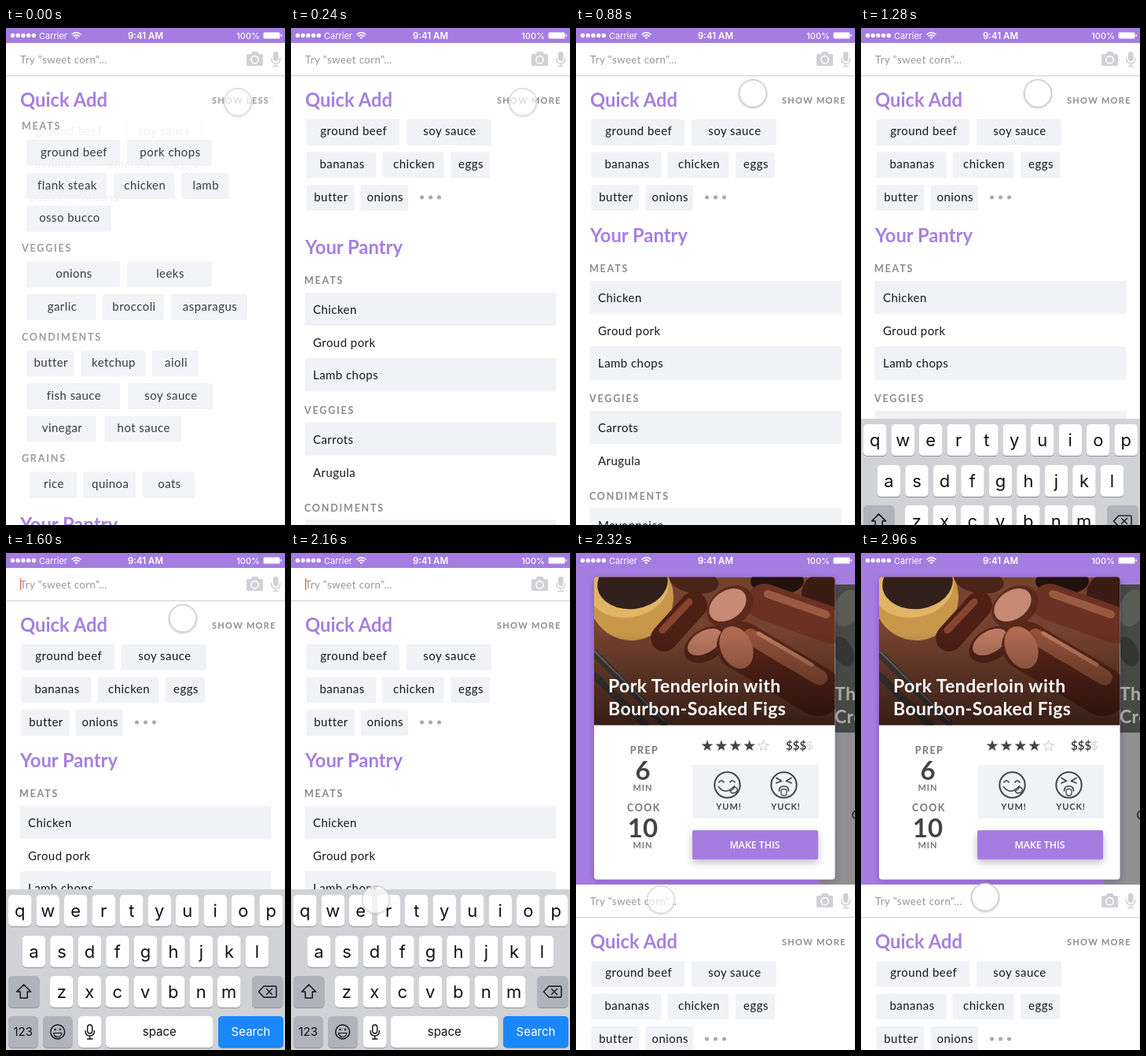
Recreate the animation shown at these times as an HTML page. Size 355 px wide and 631 px high, loop 3760 ms.

```html
<!DOCTYPE html>
<html lang="en">
<head>
<meta charset="utf-8">
<title>Pantry search</title>
<style>
  html, body { margin: 0; width: 100%; height: 100%; overflow: hidden; background: #fff; }
  svg { display: block; width: 100%; height: 100%; }
  text { font: 15px Lato, sans-serif; letter-spacing: .45px; fill: #181818; white-space: pre; }
  .mid { text-anchor: middle; }
  .title { font-size: 23.8px; font-weight: 700; letter-spacing: 0; fill: #a67fe0; }
  .head { font-size: 12.5px; font-weight: 700; letter-spacing: 1.8px; fill: #8b8b8b; }
  .toggle { font-size: 11px; font-weight: 700; letter-spacing: 1.3px; fill: #8b8b8b; }
  .hint { font-size: 13.2px; letter-spacing: .45px; fill: #96969b; }
  .status { font: 11px Inter, sans-serif; letter-spacing: 0; fill: #fff; }
  .clock { font-size: 11.5px; font-weight: 600; }
  .charge { font-weight: 500; }
  .dish { font-size: 23px; font-weight: 700; letter-spacing: .4px; fill: #fff; }
  .label { font-size: 12.5px; font-weight: 700; letter-spacing: 1.5px; fill: #777; }
  .unit { font-size: 11px; font-weight: 700; letter-spacing: 1px; fill: #777; }
  .number { font-size: 33px; font-weight: 700; letter-spacing: 0; fill: #444; }
  .price { font-weight: 700; letter-spacing: 0; fill: #444; }
  .vote { font-size: 11px; font-weight: 700; letter-spacing: .9px; fill: #444; }
  .action { font: 600 12.3px "Open Sans", sans-serif; letter-spacing: 0; fill: #fff; }
  .key { font: 22px Inter, sans-serif; letter-spacing: 0; fill: #111; }
  .small { font-size: 15px; }
</style>
</head>
<body>
<svg id="stage" viewBox="0 0 355 631"></svg>
<script>
const LOOP = 3760, STEP = 80;
const PURPLE = '#a57de1', PALE = '#f0f2f5', INK = '#444';

const rect = (x, y, w, h, fill, r = 0, more = '') =>
  `<rect x="${x}" y="${y}" width="${w}" height="${h}" rx="${r}" fill="${fill}" ${more}/>`;
const circle = (x, y, r, fill, more = '') =>
  `<circle cx="${x}" cy="${y}" r="${r}" fill="${fill}" ${more}/>`;
const oval = (x, y, rx, ry, fill, turn = 0) =>
  `<ellipse rx="${rx}" ry="${ry}" fill="${fill}" transform="translate(${x} ${y}) rotate(${turn})"/>`;
const line = (d, color, width, fill = 'none') =>
  `<path d="${d}" fill="${fill}" stroke="${color}" stroke-width="${width}" stroke-linecap="round" stroke-linejoin="round"/>`;
const text = (x, y, label, cls = '', more = '') =>
  `<text x="${x}" y="${y}" class="${cls}" ${more}>${label}</text>`;
const group = (id, ...parts) => `<g id="${id}">${parts.join('')}</g>`;

// A row of chips: [left, right, label] each.
const chips = (y, ...items) => items.map(([left, right, label]) =>
  rect(left, y, right - left, 33, PALE, 2) +
  text((left + right) / 2 + 1, y + 20.5, label, 'mid')).join('');

function statusBar() {
  let out = rect(0, 0, 355, 18.5, PURPLE);
  for (let i = 0; i < 5; i++) out += circle(8.5 + i * 6.7, 9.5, 2.7, '#fff');
  out += text(42, 13.5, 'Carrier', 'status');
  out += line('M84 8Q89.500 3.500 95 8M86 10.300Q89.500 7.500 93 10.300', '#fff', 1.6) + circle(89.5, 12.4, 1.4, '#fff');
  out += text(177.5, 13.5, '9:41 AM', 'status clock mid') + text(293.3, 13.5, '100%', 'status charge');
  return out + rect(327.5, 5.5, 21, 8, '#fff', 1.5) + rect(349.5, 8, 1.5, 3, '#fff', .7);
}

function searchBar() {
  const gray = '#d0d0d5';
  return text(18, 44.5, 'Try "sweet corn"…', 'hint') +
    `<path d="M308 33h3.500l2-3h6.500l2 3h3.500q1.500 0 1.500 1.500v12q0 1.500-1.500 1.500h-17.500q-2 0-2-1.500v-12q0-1.500 2-1.500z" fill="${gray}"/>` +
    circle(316.5, 40.3, 4.7, gray, 'stroke="#fff" stroke-width="1.6"') +
    rect(340, 30, 6.5, 12, gray, 3.2) +
    line('M337.700 38.500q0 6.500 5.500 6.500t5.500-6.500M343.200 45v3.500M340 48.500h6.500', gray, 1.5) +
    rect(0, 60, 355, 1, '#d5d5da') + rect(0, 61, 355, 1, '#f2f2f4');
}

const collapsed = () =>
  text(262, 96, 'SHOW MORE', 'toggle') +
  chips(115.7, [19.5, 138, 'ground beef'], [147, 255, 'soy sauce']) +
  chips(157.5, [19.5, 108.5, 'bananas'], [116.5, 194.5, 'chicken'], [203, 253, 'eggs']) +
  chips(199, [19.5, 80.5, 'butter'], [88.5, 149, 'onions']) +
  [166.5, 177.5, 188.5].map(x => circle(x, 215, 2.5, '#a9a9a9')).join('');

const expanded = () =>
  text(262, 96, 'SHOW LESS', 'toggle') +
  text(20, 129, 'MEATS', 'head') +
  chips(142, [26, 145, 'ground beef'], [154, 262, 'pork chops']) +
  chips(184, [26, 128, 'flank steak'], [137, 214.5, 'chicken'], [223, 283.5, 'lamb']) +
  chips(225.5, [26, 134, 'osso bucco']) +
  text(20, 283.5, 'VEGGIES', 'head') +
  chips(296.5, [26, 145, 'onions'], [154, 262, 'leeks']) +
  chips(338, [26, 115, 'garlic'], [123, 201, 'broccoli'], [210, 307, 'asparagus']) +
  text(20, 396.5, 'CONDIMENTS', 'head') +
  chips(409.5, [26, 86.5, 'butter'], [95, 177, 'ketchup'], [185.5, 245.5, 'aioli']) +
  chips(451, [26, 145, 'fish sauce'], [155, 263, 'soy sauce']) +
  chips(492.5, [26, 115, 'vinegar'], [125.5, 223, 'hot sauce']) +
  text(20, 550.5, 'GRAINS', 'head') +
  chips(563.5, [30, 90, 'rice'], [98.5, 165, 'quinoa'], [174, 240, 'oats']);

function pantry() {
  const sections = { MEATS: ['Chicken', 'Groud pork', 'Lamb chops'], VEGGIES: ['Carrots', 'Arugula'], CONDIMENTS: ['Mayonnaise'] };
  let y = 321, out = text(18, 272, 'Your Pantry', 'title');
  for (const [name, foods] of Object.entries(sections)) {
    out += text(17, y - 10.8, name, 'head');
    foods.forEach((food, i) => {
      if (i % 2 == 0) out += rect(17.5, y, 320, 42.3, PALE);
      out += text(28, y + 27, food);
      y += 41.7;
    });
    y += 40;
  }
  return out;
}

function keyboard() {
  const key = (x, y, w, label = '', fill = '#fff', cls = 'key mid', ink = '#111') =>
    rect(x, y + 1, w, 40, '#929497', 5) + rect(x, y, w, 40, fill, 5) +
    text(x + w / 2, y + (cls.includes('small') ? 25 : 27.5), label, cls, `style="fill:${ink}"`);
  const row = (letters, x, y) => [...letters].map((c, i) => key(x + i * 35.5, y, 29.5, c)).join('');
  const dark = '#b0b4ba', small = 'key small mid';
  return rect(0, 427, 355, 206, '#d0d2d6') +
    row('qwertyuiop', 3, 434) + row('asdfghjkl', 20.7, 486) + row('zxcvbnm', 56, 537) +
    key(3, 537, 39.5, '', dark) + key(313, 537, 39.5, '', dark) +
    line('M22.700 548l9 9h-4.500v8h-9v-8h-4.500z', '#111', 1.5) +
    line('M328 550h14.500q1.500 0 1.500 1.500v11q0 1.500-1.500 1.500h-14.500l-6.500-7zM331.500 553.500l7 7M338.500 553.500l-7 7', '#111', 1.4) +
    key(3, 588, 37.5, '123', dark, small) + key(47, 588, 37.5, '', dark) + key(92, 588, 29.5) +
    key(127, 588, 136.5, 'space', '#fff', small) + key(270, 588, 83, 'Search', '#1a88fb', small, '#fff') +
    circle(65.7, 608, 9, 'none', 'stroke="#111" stroke-width="1.4"') +
    circle(62.5, 605, 1.2, '#111') + circle(69, 605, 1.2, '#111') +
    line('M60.500 609.500h10.500q-1 5-5.200 5t-5.300-5', '#111', 1.2) +
    rect(103.7, 599, 6, 11, 'none', 3, 'stroke="#111" stroke-width="1.4"') +
    line('M101 606.500q0 6.500 5.700 6.500t5.700-6.500M106.700 613v4M103.500 617h6.500', '#111', 1.4);
}

// A pan of sauce, sliced roast meat, dark figs and cutlery on a wooden table.
const photo = () =>
  rect(23, 30, 306.5, 190, '#74422f') +
  oval(70, 56, 54, 55, '#c8974a', -8) + oval(66, 42, 52, 40, '#e0b566', -8) + oval(72, 38, 45, 33, '#32201c', -8) +
  oval(150, 35, 32, 16, '#4a241b', 10) + oval(256, 36, 34, 17, '#21120f') + oval(313, 52, 26, 26, '#3b1c15') +
  line('M112 108L150 66', '#4d2015', 34) + line('M110 98L144 62', '#86442f', 9) +
  line('M240 62L325 92', '#6b3122', 46) + line('M244 52L318 78', '#9a5a41', 10) +
  oval(196, 68, 32, 24, '#5c2a1d', -35) + oval(193, 66, 26, 18, '#c78a74', -35) +
  oval(166, 116, 31, 20, '#552519', -30) + oval(164, 113, 24, 14, '#bd7a62', -30) +
  line('M210 118L308 176', '#5a2619', 62) + line('M222 106L310 158', '#94523a', 20) +
  line('M232 102L300 142', '#b97a5d', 5) + oval(204, 120, 20, 28, '#b06a52', -25) +
  line('M24 128L112 216M24 156L88 218', '#443c39', 9) + line('M24 125L112 213', '#857b76', 1.5) +
  rect(23, 100, 306.5, 120, 'url(#shade)');

function star(x, y, filled) {
  const points = Array.from({ length: 10 }, (_, i) => {
    const r = i % 2 ? 2.9 : 7.2, a = i * Math.PI / 5;
    return `${x + r * Math.sin(a)},${y - r * Math.cos(a)}`;
  });
  return `<polygon points="${points.join(' ')}" fill="${filled ? INK : '#fff'}" stroke="${filled ? INK : '#ccc'}" stroke-width="${filled ? .3 : 1}"/>`;
}

function recipe() {
  const face = x => circle(x, 294.5, 16.2, 'none', `stroke="${INK}" stroke-width="2"`);
  return rect(0, 0, 355, 640, PURPLE) +
    rect(309, 40, 60, 400, '#909090') + rect(309, 40, 60, 188, '#474944') +
    oval(345, 70, 16, 24, '#5a5c56', 20) + oval(340, 125, 12, 20, '#343731', -25) +
    text(329, 187, 'Th', 'dish', 'opacity=".55"') + text(329, 216, 'Cro', 'dish', 'opacity=".55"') +
    text(350.5, 338, 'C') +
    rect(23, 30.5, 306.5, 384, '#fff', 4, 'filter="url(#drop)"') +
    `<g clip-path="url(#photoBox)">${photo()}</g>` +
    text(41, 177, 'Pork Tenderloin with', 'dish') + text(41, 206, 'Bourbon-Soaked Figs', 'dish') +
    text(87, 255, 'PREP', 'label mid') + text(85, 288, '6', 'number mid') + text(85, 302, 'MIN', 'unit mid') +
    text(86.5, 328, 'COOK', 'label mid') + text(85, 360.5, '10', 'number mid') + text(85, 375, 'MIN', 'unit mid') +
    [0, 1, 2, 3, 4].map(i => star(167 + i * 17.9, 245, i < 4)).join('') +
    text(267, 249.5, '$$$<tspan fill="#ddd">$</tspan>', 'price') +
    rect(148.5, 269, 160.5, 68, PALE) + face(192.5) + face(264.5) +
    line('M182 291q3-4 6 0M196 291q3-4 6 0M181.500 297q9 11 20-1', INK, 1.7) +
    line('M196 302q5-1.500 5.500-5q5 1.500 3.500 5t-7 2.500z', INK, 1.4, PALE) +
    line('M255 285.500l6.500 4-6.500 2.500M274 285.500l-6.500 4 6.500 2.500', INK, 1.7) +
    line('M258.500 302q0-6 6-6t6 6', INK, 1.7) +
    line('M261 301q3.500-3 7 0v4q0 3-3.500 3t-3.500-3z', INK, 1.3, PALE) +
    text(194.5, 326, 'YUM!', 'vote mid') + text(267, 326, 'YUCK!', 'vote mid') +
    rect(148, 352, 160, 37, PURPLE, 2, 'filter="url(#glow)"') + text(227.5, 375, 'MAKE THIS', 'action mid');
}

const stage = document.getElementById('stage');
stage.innerHTML = `<defs>
    <linearGradient id="shade" x2="0" y2="1"><stop stop-opacity="0"/><stop offset="1" stop-opacity=".55"/></linearGradient>
    <filter id="drop" x="-20%" y="-20%" width="140%" height="150%"><feDropShadow dx="0" dy="2" stdDeviation="4" flood-color="#3a1a70" flood-opacity=".32"/></filter>
    <filter id="glow" x="-20%" y="-50%" width="140%" height="220%"><feDropShadow dx="0" dy="4" stdDeviation="5" flood-color="#4a3a70" flood-opacity=".35"/></filter>
    <filter id="soft" x="-30%" y="-30%" width="160%" height="160%"><feDropShadow dx="0" dy="1" stdDeviation="1.2" flood-opacity=".22"/></filter>
    <clipPath id="photoBox"><path d="M23 218.500V34.500q0-4 4-4h298.500q4 0 4 4v184z"/></clipPath>
  </defs>` +
  recipe() +
  group('panel',
    rect(0, 19, 355, 700, '#fff'),
    rect(354, 19, 1, 700, '#f4f4f5'),
    searchBar(),
    group('cursor', rect(18, 32, 1.3, 15, '#e0674f')),
    text(18, 100, 'Quick Add', 'title'),
    group('collapsed', collapsed()),
    group('expanded', expanded()),
    group('pantry', pantry())) +
  group('keyboard', keyboard()) +
  statusBar() +
  group('touch', circle(0, 0, 17.3, '#fff', 'stroke="#cdcdd1" stroke-width="1.6" filter="url(#soft)"'));

const part = id => document.getElementById(id);
const move = (id, x, y) => part(id).setAttribute('transform', `translate(${x} ${y})`);
const fade = (id, value) => part(id).setAttribute('opacity', clamp(value));
const clamp = v => Math.min(1, Math.max(0, v));
const ramp = (t, from, to) => clamp((t - from) / (to - from));
const smooth = u => u * u * (3 - 2 * u);

const touchStart = [295, 94];
const touchMoves = [[440, 720, 225, 83], [1600, 2160, 108, 440], [2640, 2960, 158, 437]];

function draw(t) {
  fade('collapsed', .06 + t / 200);
  fade('expanded', .85 - t / 220);
  move('pantry', 0, 367 * (1 - ramp(t, 0, 400)) ** 3.5);

  const reveal = 1 - (1 - ramp(t, 2160, 2320)) ** 2;
  const raised = 1 - (1 - ramp(t, 1080, 1600)) ** 2.25;
  move('panel', 0, 402 * reveal);
  move('keyboard', 0, 206 * (1 - raised + reveal));
  fade('cursor', t >= 1360 && t < 2240 ? 1 : 0);

  let [x, y] = touchStart;
  for (const [from, to, toX, toY] of touchMoves) {
    const u = smooth(ramp(t, from, to));
    x += (toX - x) * u;
    y += (toY - y) * u;
  }
  move('touch', x, y);
  fade('touch', t < 440 || (t >= 2160 && t < 2720) ? .7 : 1);
}

const start = performance.now();
function tick() {
  const t = (performance.now() - start) % LOOP;
  draw(Math.floor(t / STEP) * STEP);
  requestAnimationFrame(tick);
}
tick();
</script>
</body>
</html>
```
